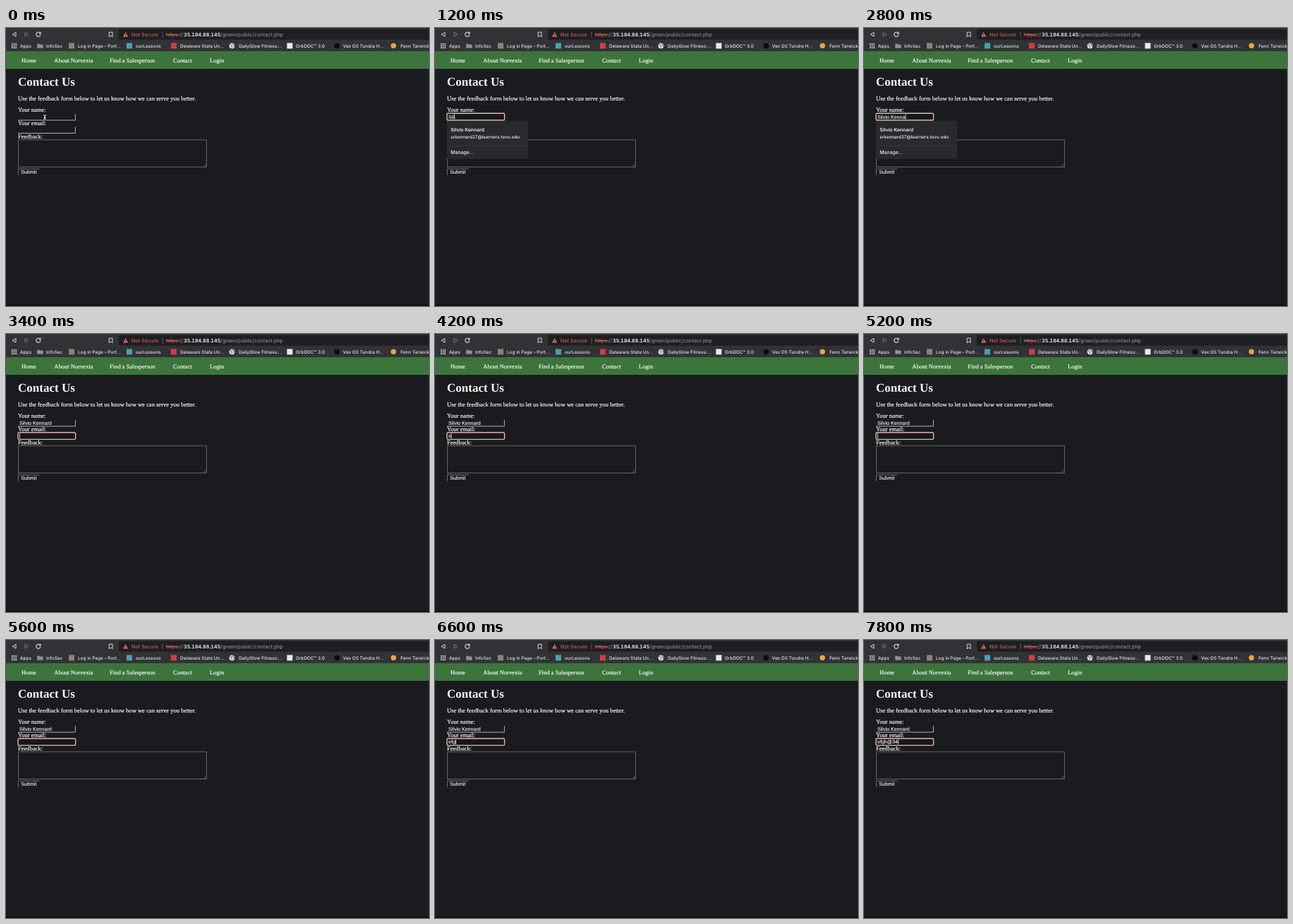
These frames come from a looping animation (600x395 px, 8 s). An HTML page:

```html
<!DOCTYPE html>
<html lang="en">
<head>
<meta charset="utf-8">
<title>Contact Us</title>
<style>
  html, body { margin: 0; width: 100%; height: 100%; overflow: hidden; background: #1a1b1e; }
  svg { display: block; width: 100vw; height: 100vh; text-rendering: geometricPrecision; }
  text { white-space: pre; }
  .page { font: 8.55px "Liberation Serif", serif; fill: #fafafa; stroke: #fafafa; stroke-width: .16; }
  .title { font-size: 17.04px; font-weight: bold; stroke: none; }
  .form { font: 7.1px "Liberation Sans", sans-serif; fill: #fafafa; stroke: #fafafa; stroke-width: .1; }
  .ui { font: 500 6.4px Inter, sans-serif; fill: #e6e7e9; }
  .popup { font: 500 6.9px Inter, sans-serif; fill: #f2f2f3; }
  .popup .strong { font-weight: 600; }
  .popup .small { font-size: 6.35px; }
  .url { font: 7.2px Inter, sans-serif; fill: #9c9ea2; }
  .host { font-weight: 600; font-variant-numeric: tabular-nums; fill: #f2f3f4; }
  .url.warn, .warn { fill: #e2695e; }
  .line { fill: none; stroke: #d6d7d9; }
  .faint { fill: none; stroke: #77787b; }
  .ring { fill: #17181b; stroke: #ebb0b5; stroke-width: 1.4; }
</style>
</head>
<body>
<svg viewBox="0 0 600 395">
  <rect width="600" height="395" fill="#1a1b1e"/>
  <rect y="392.5" width="600" height="2.5" fill="#130f13"/>

  <!-- toolbar -->
  <rect width="600" height="33" fill="#313236"/>
  <rect x="160" y="1.5" width="446" height="15" rx="2.5" fill="#1e1f22"/>
  <g class="line" stroke-linejoin="round">
    <path d="M14 6.2V12L9.2 9.1Z"/>
    <path class="faint" d="M27 6.2V12L31.8 9.1Z"/>
    <path d="M48.4 7.2A3.1 3.1 0 1 0 49 9.6M49 5.6V8H46.6" stroke-width="1.2"/>
    <path d="M146.2 6H151V12.6L148.6 10.6L146.2 12.6Z"/>
  </g>
  <path class="warn" d="M169.6 5.8L173.2 12.4H166Z"/>
  <path d="M169.6 8V10M169.6 10.7V11.5" stroke="#1e1f22" stroke-width=".8"/>
  <text class="url warn" x="178" y="12">Not Secure</text>
  <path class="faint" d="M222 5V14" stroke-width=".7"/>
  <text class="url" x="227" y="12"><tspan class="warn">https</tspan>://</text>
  <path d="M226.5 9.6H246" stroke="#e2695e" stroke-width=".8"/>
  <text class="url" x="252" y="12"><tspan class="host">35.184.88.145</tspan>/green/public/contact.php</text>

  <!-- bookmarks -->
  <g id="apps" fill="#c9cacd"></g>
  <path d="M44.2 22.4H47.4L48.4 23.4H52.6V28.5H44.2Z" fill="#8f9195"/>
  <rect x="89" y="21.3" width="8" height="8" fill="#8d8371"/>
  <rect x="171" y="21.3" width="8" height="8" fill="#4a9fb4"/>
  <rect x="234" y="21.3" width="8" height="8" fill="#d23c42"/>
  <circle cx="320.6" cy="25.3" r="3.9" fill="#e6e7e9"/>
  <path d="M317.5 23.2L320 24L319.4 25.6L321 27L319.8 28.6M321.6 22L322 24L324 24.8L323 27" fill="none" stroke="#4a4b4f" stroke-width=".9"/>
  <rect x="398.5" y="21.3" width="8" height="8" fill="#efe6e5"/>
  <circle cx="469.5" cy="25.3" r="3.9" fill="#0c0c0d"/>
  <circle cx="549.6" cy="25.3" r="3.7" fill="#e6a93a"/>
  <g id="bookmarks" class="ui"></g>

  <!-- page -->
  <rect y="33" width="600" height="25" fill="#3c743b"/>
  <g id="nav" class="page"></g>
  <text class="page title" x="17" y="82">Contact Us</text>
  <g id="labels" class="page"></g>

  <g class="line" stroke-width=".8">
    <path d="M17 131H98.4V122"/>
    <path d="M17 149.5H98.4V140.5"/>
    <path d="M17.4 209V200.2H47.5" stroke-opacity=".6"/>
    <rect class="faint" x="17.4" y="158.9" width="267" height="38.7"/>
    <path class="faint" d="M280.5 196.6L283.6 193.5M282.4 196.6L283.6 195.4"/>
  </g>
  <text class="form" x="21.3" y="206.7">Submit</text>

  <rect id="ring" class="ring" x="17" width="81.6" height="9.6" rx="1.6"/>
  <text id="name" class="form" x="19" y="128.6"></text>
  <text id="email" class="form" x="19" y="147.2"></text>
  <rect id="caret" width=".8" height="7.2" fill="#f4f4f4"/>

  <g id="popup" class="popup">
    <rect x="17" y="132" width="115" height="54" rx="1" fill="#292a2d"/>
    <path d="M17 167.3H132" stroke="#3c3d41" stroke-width=".8"/>
    <text class="strong" x="22.3" y="146.9">Silvio Kennard</text>
    <text class="small" x="22.3" y="156.8">srkennard27@learners.tovu.edu</text>
    <text x="22.3" y="179.4">Manage...</text>
  </g>

  <defs>
    <path id="beam" d="M53.3 123.6Q55 123.6 55 125V129Q55 130.4 53.3 130.4M56.7 123.6Q55 123.6 55 125V129Q55 130.4 56.7 130.4M54 127.6H56"/>
  </defs>
  <g id="pointer" fill="none" stroke-linecap="round">
    <use href="#beam" stroke="#111" stroke-width="1.9"/>
    <use href="#beam" stroke="#f2f2f2" stroke-width=".9"/>
  </g>
</svg>
<script>
const LOOP = 8000;
const NAME = "Silvio Kennard", FIRST_TRY = "si", EMAIL = "efgh@34";
const $ = id => document.getElementById(id);
const SVG = "http://www.w3.org/2000/svg";

function add(parent, tag, attrs, content = "") {
  const node = document.createElementNS(SVG, tag);
  for (const key in attrs) node.setAttribute(key, attrs[key]);
  node.textContent = content;
  $(parent).append(node);
}

for (let i = 0; i < 9; i++)
  add("apps", "rect", { x: 8 + i % 3 * 2.7, y: 21.8 + Math.floor(i / 3) * 2.7, width: 1.8, height: 1.8 });

[[20, "Apps"], [57, "InfoSec"], [102, "Log in Page – Port..."], [184, "ourLessons"],
 [247, "Delaware State Un..."], [330, "DailyGlow Fitness:..."], [411, "OrbDOC™ 3.0"],
 [478, "Vex OS Tundra H..."], [559.5, "Fenn Tarwick"]]
  .forEach(([x, label]) => add("bookmarks", "text", { x, y: 27.6 }, label));

[[22, "Home"], [68.3, "About Norvexia"], [147, "Find a Salesperson"], [237, "Contact"], [289, "Login"]]
  .forEach(([x, label]) => add("nav", "text", { x, y: 48.6 }, label));

[[103, "Use the feedback form below to let us know how we can serve you better."],
 [119.3, "Your name:"], [138, "Your email:"], [156.8, "Feedback:"]]
  .forEach(([y, label]) => add("labels", "text", { x: 17, y }, label));

// time, focused field, text being typed, characters present, caret shown
const steps = [
  [0, "", "", 0, false],
  [400, "name", NAME, 0, true],
  [800, "name", NAME, 1, true], [1000, "name", NAME, 2, true], [1200, "name", NAME, 3, true],
  [1400, "name", NAME, 4, true], [1600, "name", NAME, 5, true], [1800, "name", NAME, 6, true],
  [2000, "name", NAME, 7, true], [2200, "name", NAME, 8, true], [2400, "name", NAME, 9, true],
  [2600, "name", NAME, 11, true], [2800, "name", NAME, 12, true], [3000, "name", NAME, 13, true],
  [3200, "name", NAME, 14, true],
  [3400, "email", FIRST_TRY, 0, true],
  [4200, "email", FIRST_TRY, 1, true], [4600, "email", FIRST_TRY, 2, true],
  [5000, "email", FIRST_TRY, 1, true], [5200, "email", FIRST_TRY, 0, true],
  [5600, "email", EMAIL, 0, false], [6000, "email", EMAIL, 0, true],
  [6200, "email", EMAIL, 1, true], [6400, "email", EMAIL, 2, true], [6600, "email", EMAIL, 3, true],
  [6800, "email", EMAIL, 4, true], [7400, "email", EMAIL, 5, true], [7600, "email", EMAIL, 6, true],
  [7800, "email", EMAIL, 7, true]
];

const show = (id, on) => $(id).setAttribute("visibility", on ? "visible" : "hidden");

function draw(time) {
  const [, field, text, count, caret] = steps.findLast(step => step[0] <= time);
  const value = text.slice(0, count);
  const top = field === "name" ? 121.3 : 140;

  $("name").textContent = field === "email" ? NAME : value;
  $("email").textContent = field === "email" ? value : "";
  $("ring").setAttribute("y", top);
  show("ring", field);
  show("popup", field === "name" && value);
  show("pointer", time < 800);
  show("caret", caret);
  if (caret) {
    const width = value ? $(field).getComputedTextLength() : 0;
    $("caret").setAttribute("x", 19.2 + width);
    $("caret").setAttribute("y", top + 1.2);
  }
}

const start = performance.now();
function tick(now) {
  draw(Math.max(0, now - start) % LOOP);
  requestAnimationFrame(tick);
}
draw(0);
requestAnimationFrame(tick);
</script>
</body>
</html>
```
